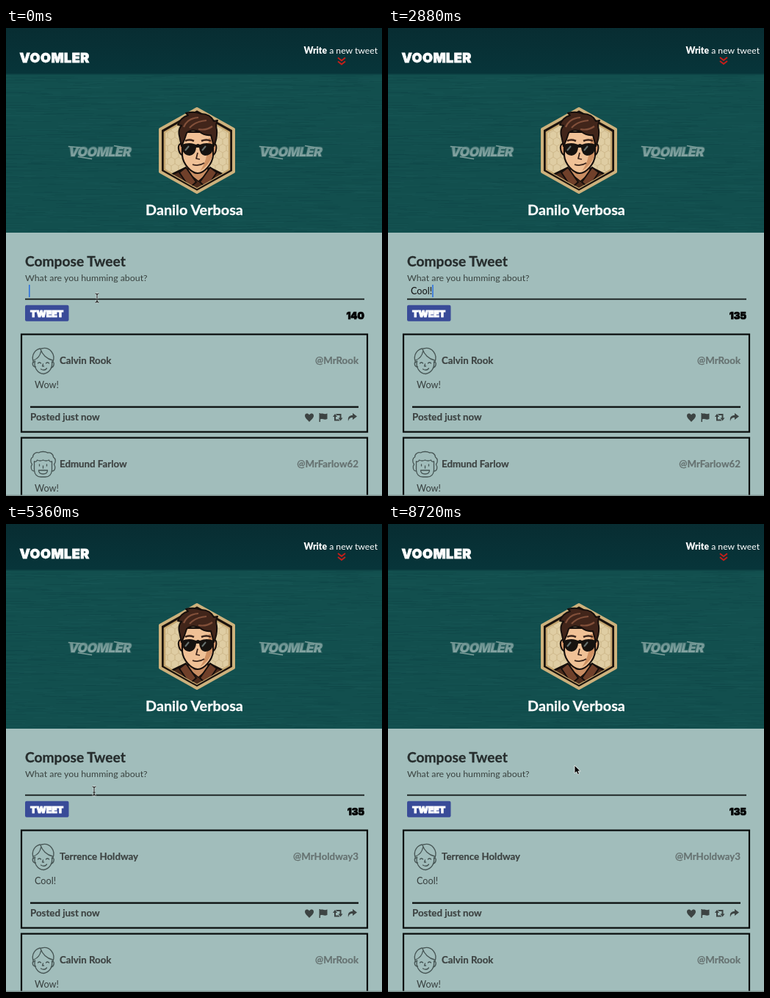
Write an HTML page that moves like this. It is 512 px wide and 638 px high and loops after 8.8 s.

```html
<!DOCTYPE html>
<html lang="en">
<head>
<meta charset="utf-8">
<title>Compose</title>
<style>
html, body { margin: 0; width: 100%; height: 100%; overflow: hidden; background: #a1bdbb; }
svg { display: block; width: 512px; height: 638px; font-family: Lato, "Open Sans", sans-serif; }
.block { font-family: Inter, "DejaVu Sans", sans-serif; font-weight: 900; paint-order: stroke; stroke-linejoin: miter; }
.b { font-weight: 700; }
.end { text-anchor: end; }
.line { fill: none; stroke: #465554; stroke-width: 1.3; stroke-linecap: round; stroke-linejoin: round; }
</style>
</head>
<body>
<svg id="stage" viewBox="0 0 512 638">
  <defs>
    <linearGradient id="bar" x2="0" y2="1">
      <stop offset="0" stop-color="#082d32"/><stop offset="1" stop-color="#07353a"/>
    </linearGradient>
    <linearGradient id="steel" x2="0" y2="1">
      <stop offset="0" stop-color="#5f8a88"/><stop offset="1" stop-color="#8daaa8"/>
    </linearGradient>
    <g id="boy" class="line">
      <path d="M-11 0C-13 8 -8 17 1 17.500C9 16 13 9 12 1"/>
      <path d="M-11 1C-16 0 -15 8 -10 8M13 1C16 2 15 8 11 9"/>
      <path d="M-13 2C-17 -9 -10 -17 -2 -17C9 -20 18 -9 13 2M-4 -17C-1 -9 4 -3 13 -1M-3 -13C-4 -7 -8 -3 -13 -1"/>
      <path d="M-7 3Q-5 1 -3 3M4 3Q6 1 8 3M0 4L-1 7H1M-3 11Q2 14 5 10"/>
    </g>
    <g id="curly" class="line">
      <path d="M-12 -4V8Q-11 17 -3 17H3Q11 17 12 8V-4"/>
      <path d="M-12 9C-17 9 -17 2 -15 0C-18 -4 -17 -9 -14 -10C-14 -15 -9 -17 -6 -16C-3 -18 3 -18 6 -16C10 -17 14 -14 14 -10C17 -8 18 -4 15 0C17 3 17 9 12 9"/>
      <path d="M-12 -4Q-9 -3 -8 -6Q-4 -4 0 -6Q4 -4 8 -6Q9 -3 12 -4"/>
      <path d="M-5 0V2M5 0V2M0 2V5M-6 8H6Q6 13 0 13Q-6 13 -6 8Z"/>
    </g>
    <g id="actions" fill="#3d4443">
      <path d="M413 537C409 533 407 531 407 528.500C407 525 411 524.500 413 527.500C415 524.500 419 525 419 528.500C419 531 417 533 413 537Z"/>
      <path d="M426.500 525H428V526C431 524.500 433 527.500 437.500 525.500V533C433 535 431 532 428 533.500V537H426.500Z"/>
      <path d="M445 530L448 526L451 530H449V533.500H453L454.500 535.500H447V530ZM458.500 531.500L455.500 535.500L452.500 531.500H454.500V528H450.500L449 526H456.500V531.500Z"/>
      <path d="M466 536C465 530 468 528 472 528V525L478 529.500L472 534V531C469 531 467 532 466 536Z"/>
    </g>
    <clipPath id="hexclip"><path d="M260 117L304 142V193L260 218L216 193V142Z"/></clipPath>
  </defs>

  <rect width="512" height="638" fill="#a1bdbb"/>
  <rect y="62" width="512" height="217" fill="#124f4e"/>
  <path id="dark" fill="none" stroke="#0b4344" opacity=".28"/>
  <path id="light" fill="none" stroke="#1d5d5a" opacity=".22"/>
  <rect width="512" height="62.500" fill="url(#bar)"/>
  <rect y="62" width="512" height="1.500" fill="#0b3e41"/>

  <text class="block" x="18.500" y="46.700" font-size="18" letter-spacing=".5" fill="#fff" stroke="#fff" stroke-width=".8">VOOMLER</text>
  <text class="end" x="506" y="35" font-size="12.200" fill="#fff"><tspan font-weight="900">Write</tspan> a new tweet</text>
  <path id="chevrons" d="M452 40.500L457 44.500L462 40.500M452 45.500L457 49.500L462 45.500" fill="none" stroke="#c51f1a" stroke-width="2"/>

  <g id="marks"></g>

  <g stroke-linejoin="round">
    <path d="M260 110L310 138V196L260 224L210 196V138Z" fill="#1b130e" stroke="#cdb17c" stroke-width="4"/>
    <path d="M260 117L304 142V193L260 218L216 193V142Z" fill="#dfcda3" stroke="#c5a66f" stroke-width="2.500"/>
    <path id="comb" fill="none" stroke="#c9b285" stroke-width=".8" opacity=".6" clip-path="url(#hexclip)"/>
    <g clip-path="url(#hexclip)">
      <path d="M219 203L244 191L260 205L278 191L302 203V222H219Z" fill="#4b2a1b" stroke="#160f0c" stroke-width="3"/>
      <path d="M248 185H275V198L262 209L248 198Z" fill="#c98d62" stroke="#160f0c" stroke-width="1.500"/>
      <path d="M245 190L259 210L250 218L236 197ZM278 190L264 210L273 218L287 197Z" fill="#70402a" stroke="#160f0c" stroke-width="2"/>
    </g>
    <path d="M240 158C232 156 234 171 241 174M282 158C289 156 287 171 281 174" fill="#d79a6c" stroke="#160f0c" stroke-width="2"/>
    <path d="M240 142H282V174C281 185 270 198 261 198C252 198 241 185 240 174Z" fill="#f0c196" stroke="#160f0c" stroke-width="2.200"/>
    <path d="M276 150H281V174Q277 187 264 195Q275 181 276 150Z" fill="#cf9163"/>
    <path d="M239 161L236 147Q234 139 239 133L234 132Q238 122 248 119L245 116Q256 113 266 117Q278 117 283 127L288 126Q285 131 287 139Q288 150 283 161L279 146Q270 147 263 141Q252 137 246 143L243 152Z" fill="#41251a" stroke="#160f0c" stroke-width="2"/>
    <path d="M242 135Q247 123 262 122M250 136Q258 127 273 126M262 138Q273 140 281 134" fill="none" stroke="#82503a" stroke-width="2.200"/>
    <path d="M239 159Q250 155 259 159Q261 157 264 159Q273 155 283 159L282 166Q279 174 271 174Q264 173 263 163H259Q258 173 250 174Q242 173 240 166Z" fill="#16120f"/>
    <path d="M244 167L249 161M267 167L272 161" stroke="#687270" stroke-width="2"/>
    <path d="M244 154Q249 151 256 154M266 154Q273 151 279 154" fill="none" stroke="#39231a" stroke-width="2.500"/>
    <path d="M261 170L259 178L264 179M254 186Q262 189 270 184" fill="none" stroke="#39231a" stroke-width="1.700"/>
  </g>

  <text class="b" x="256.500" y="254.500" text-anchor="middle" font-size="19.800" fill="#fff" stroke="#fff" stroke-width=".3">Danilo Verbosa</text>

  <text class="b" x="26" y="324.500" font-size="19.200" fill="#262d2d" stroke="#262d2d" stroke-width=".3">Compose Tweet</text>
  <text x="26" y="345" font-size="12.350" fill="#39423f">What are you humming about?</text>
  <text id="draft" x="31" y="362.500" font-size="12.700" fill="#111"></text>
  <rect id="caret" x="31" y="350" width="1.600" height="17" fill="#2e72dd"/>
  <path d="M26 369.600H488" stroke="#101615" stroke-width="1.600"/>
  <rect id="button" x="26" y="377.700" width="59.500" height="22" rx="2"/>
  <text class="block" x="33" y="393.500" font-size="12.300" fill="#fff" stroke="#fff" stroke-width="1">TWEET</text>
  <text id="count" class="block end" x="488" y="397.300" font-size="13.200" stroke="#000" stroke-width=".7"></text>

  <g id="before"></g>
  <g id="after"></g>
  <rect y="636.500" width="512" height="1.500" fill="#7d908e"/>

  <g id="ibeam" fill="none">
    <path d="M-2.500 -6Q0 -6 0 -4V4Q0 6 -2.500 6M2.500 -6Q0 -6 0 -4M0 4Q0 6 2.500 6" stroke="#e8f0ef" stroke-width="2.400"/>
    <path d="M-2.500 -6Q0 -6 0 -4V4Q0 6 -2.500 6M2.500 -6Q0 -6 0 -4M0 4Q0 6 2.500 6M-1.500 2H1.500" stroke="#151918" stroke-width="1.100"/>
  </g>
  <path id="hand" d="M-1.500 1Q0 -1 1.500 1V5Q3 4 3.500 5.500Q5 4.500 5.500 6Q7.500 5.500 7.500 8V10L6 12V14H-1V12L-4 8Q-5 6 -3 6L-1.500 7.500Z" fill="#fff" stroke="#161616" stroke-width="1.200"/>
  <path id="arrow" d="M0 0V11L2.600 8.700L4.400 12.500L6.500 11.500L4.800 7.900H8.200Z" fill="#050505" stroke="#e9efee" stroke-width=".9"/>
</svg>
<script>
const LOOP = 8800, STEP = 80, POSTED = 4400;
const $ = id => document.getElementById(id);

const people = {
  new: ["Terrence Holdway", "@MrHoldway3", "Cool!", "boy"],
  top: ["Calvin Rook", "@MrRook", "Wow!", "boy"],
  low: ["Edmund Farlow", "@MrFarlow62", "Wow!", "curly"]
};

function card([name, handle, text, face], row) {
  return `<g transform="translate(0 ${row * 141})">
    <rect x="21" y="417.600" width="471" height="133" fill="none" stroke="#070b0a" stroke-width="2.200"/>
    <use href="#${face}" x="50.500" y="454"/>
    <text class="b" x="73" y="458.300" font-size="13.300" fill="#3d4342" stroke="#3d4342" stroke-width=".2">${name}</text>
    <text class="b end" x="480" y="458.300" font-size="13.300" fill="#667271" stroke="#667271" stroke-width=".2">${handle}</text>
    <text x="39" y="491.300" font-size="12.700" fill="#363e3d">${text}</text>
    <path d="M33 516.700H480" stroke="#070b0a" stroke-width="2.200"/>
    <text class="b" x="33" y="535.300" font-size="13.300" fill="#3d4342" stroke="#3d4342" stroke-width=".2">Posted just now</text>
    <use href="#actions"/>
  </g>`;
}
$("before").innerHTML = card(people.top, 0) + card(people.low, 1);
$("after").innerHTML = card(people.new, 0) + card(people.top, 1);

// Slanted wordmarks with a loose, brushed crossbar
$("marks").innerHTML = [84, 344].map(x =>
  `<g transform="translate(${x} 174.500) skewX(-12)">
    <text class="block" font-size="17.500" letter-spacing="-.6" fill="url(#steel)" stroke="#2d6160" stroke-width="2">VOOMLER</text>
    <path d="M-2 -13L20 -11M14 1L34 4M60 -14L84 -10" stroke="#7b9d9a" stroke-width="1.500"/>
  </g>`).join("");

// Brushed streaks behind the profile
let seed = 11;
const rand = () => (seed = seed * 16807 % 2147483647) / 2147483647;
function streaks(n) {
  let d = "";
  for (let i = 0; i < n; i++) {
    const y = 64.5 + Math.floor(rand() * 214);
    d += `M${(rand() * 540 - 40).toFixed()} ${y}h${(10 + rand() * 50).toFixed()}`;
  }
  return d;
}
$("dark").setAttribute("d", streaks(800));
$("light").setAttribute("d", streaks(600));

let comb = "";
for (let r = 0; r < 13; r++)
  for (let c = 0; c < 10; c++)
    comb += `M${210 + c * 10 + r % 2 * 5} ${113 + r * 9}l5 3v6l-5 3l-5 -3v-6z`;
$("comb").setAttribute("d", comb);

const typed = [[1840, "C"], [2160, "Co"], [2320, "Coo"], [2560, "Cool"], [2800, "Cool!"]];
const path = [[0, 124, 368], [2960, 124, 368], [3520, 42, 398], [5120, 42, 398], [5360, 120, 364], [5760, 254, 329], [LOOP, 254, 329]];

function mouseAt(t) {
  const i = Math.max(1, path.findIndex(p => p[0] > t));
  const [t0, x0, y0] = path[i - 1], [t1, x1, y1] = path[i];
  const k = (t - t0) / (t1 - t0);
  return [x0 + (x1 - x0) * k, y0 + (y1 - y0) * k];
}

function caretAlpha(t) {
  if (t >= 1760 && t < 4240) return 1;
  const p = t % 1120;
  return p < 640 ? 1 : p < 800 ? (800 - p) / 160 : p < 1040 ? 0 : (p - 1040) / 80;
}

function show(id, on) { $(id).style.display = on ? "" : "none"; }

function draw(t) {
  const word = typed.reduce((s, [at, v]) => t >= at ? v : s, "");
  const posted = t >= POSTED;
  $("draft").textContent = posted ? "" : word;
  $("count").textContent = 140 - word.length;
  $("caret").setAttribute("x", 31 + (word && !posted ? $("draft").getComputedTextLength() : 0));
  $("caret").style.opacity = t < 4240 ? caretAlpha(t) : 0;
  show("before", !posted);
  show("after", posted);

  const [x, y] = mouseAt(t);
  const over = x > 26 && x < 85 && y > 378 && y < 400;
  const field = y > 346 && y < 371;
  const kind = over ? "hand" : field ? "ibeam" : "arrow";
  const hidden = t >= 1840 && t < 2960;
  for (const id of ["hand", "ibeam", "arrow"]) {
    show(id, id === kind && !hidden);
    $(id).setAttribute("transform", `translate(${x} ${y})`);
  }
  $("button").setAttribute("fill", over ? "#a83bfa" : "#394b98");
  const bob = 0.6 * Math.sin(t / LOOP * 16 * Math.PI);
  $("chevrons").setAttribute("transform", `translate(0 ${bob.toFixed(2)})`);
}

const start = performance.now();
function tick() {
  const t = (performance.now() - start) % LOOP;
  draw(Math.floor(t / STEP) * STEP);
  requestAnimationFrame(tick);
}
draw(0);
requestAnimationFrame(tick);
</script>
</body>
</html>
```
